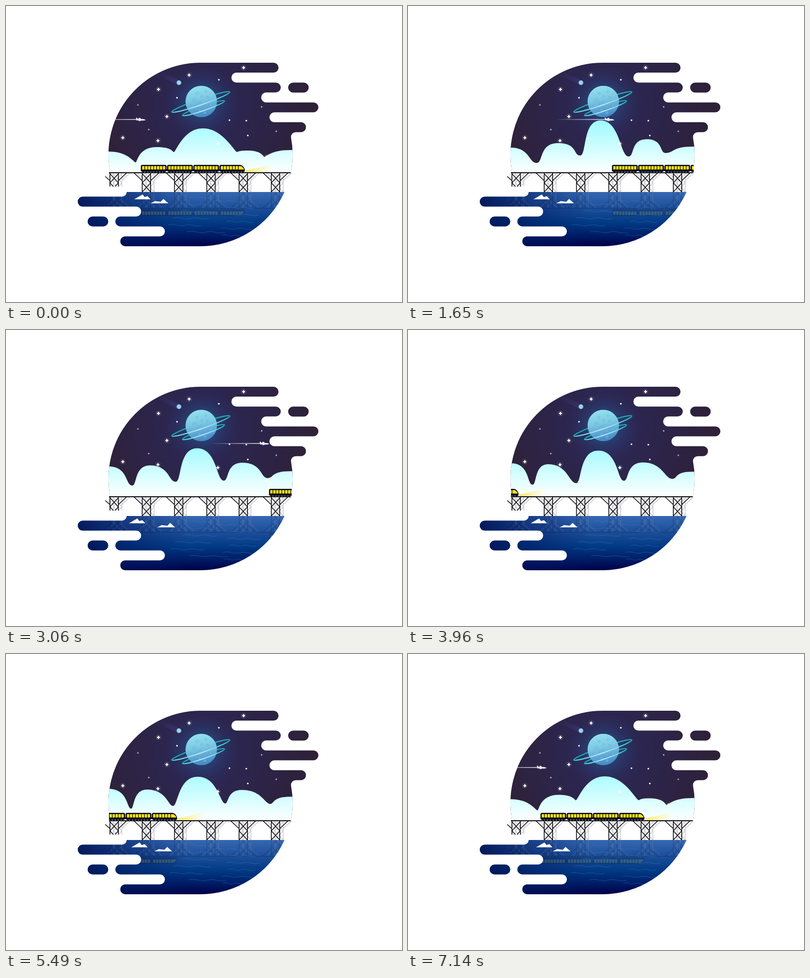
Recreate the animation shown at these times as an HTML page. Size 800 px wide and 600 px high, loop 7.17 s.

```html
<!DOCTYPE html>
<html lang="en">
<head>
<meta charset="utf-8">
<title>Night train</title>
<style>
html, body { margin: 0; width: 100%; height: 100%; overflow: hidden; background: #fff; }
svg { display: block; width: 100%; height: 100%; }
</style>
</head>
<body>
<svg viewBox="0 0 800 600" xmlns="http://www.w3.org/2000/svg">
  <defs>
    <radialGradient id="skyFill" gradientUnits="userSpaceOnUse" cx="398" cy="200" r="215">
      <stop offset="0" stop-color="#2d2b60"/><stop offset=".35" stop-color="#2c264f"/>
      <stop offset=".7" stop-color="#2d2344"/><stop offset="1" stop-color="#2e2138"/>
    </radialGradient>
    <radialGradient id="halo">
      <stop offset=".3" stop-color="#1d7099" stop-opacity=".42"/><stop offset=".65" stop-color="#22508c" stop-opacity=".15"/>
      <stop offset="1" stop-color="#2d2b60" stop-opacity="0"/>
    </radialGradient>
    <radialGradient id="starGlow">
      <stop offset="0" stop-color="#fffbd8" stop-opacity=".28"/><stop offset="1" stop-color="#fffbd8" stop-opacity="0"/>
    </radialGradient>
    <linearGradient id="planetFill" x2=".2" y2="1">
      <stop offset="0" stop-color="#98e6f2"/><stop offset=".5" stop-color="#7cc8e3"/><stop offset="1" stop-color="#4a8dc8"/>
    </linearGradient>
    <linearGradient id="ringFill">
      <stop offset="0" stop-color="#3fd4dc"/><stop offset=".45" stop-color="#c0ecfb"/>
      <stop offset=".75" stop-color="#7adbe6"/><stop offset="1" stop-color="#12b3b3"/>
    </linearGradient>
    <linearGradient id="cometTail" gradientUnits="userSpaceOnUse" x1="350" y1="156" x2="304" y2="134">
      <stop offset="0" stop-color="#45458c" stop-opacity=".45"/><stop offset="1" stop-color="#3a3570" stop-opacity="0"/>
    </linearGradient>
    <linearGradient id="cloudFill" gradientUnits="userSpaceOnUse" x1="0" y1="236" x2="0" y2="338">
      <stop offset="0" stop-color="#a2fbff"/><stop offset=".5" stop-color="#cffdff"/><stop offset="1" stop-color="#fff"/>
    </linearGradient>
    <linearGradient id="trailFill">
      <stop offset="0" stop-color="#fff" stop-opacity="0"/><stop offset="1" stop-color="#dcd8ea" stop-opacity=".9"/>
    </linearGradient>
    <linearGradient id="beamFill">
      <stop offset="0" stop-color="#ffe75c"/><stop offset=".4" stop-color="#ffef94" stop-opacity=".75"/>
      <stop offset="1" stop-color="#fff6c0" stop-opacity="0"/>
    </linearGradient>
    <linearGradient id="waterFill" gradientUnits="userSpaceOnUse" x1="0" y1="377" x2="0" y2="487">
      <stop offset="0" stop-color="#3668b2"/><stop offset=".3" stop-color="#1c4e99"/>
      <stop offset=".58" stop-color="#003882"/><stop offset=".8" stop-color="#001c66"/><stop offset="1" stop-color="#000046"/>
    </linearGradient>
    <linearGradient id="waterShade" gradientUnits="userSpaceOnUse" x1="150" y1="0" x2="370" y2="0">
      <stop offset="0" stop-color="#00104f" stop-opacity=".85"/><stop offset=".4" stop-color="#00185c" stop-opacity=".55"/>
      <stop offset="1" stop-color="#00206a" stop-opacity="0"/>
    </linearGradient>
    <clipPath id="skyClip">
      <path id="skyShape"/>
      <rect x="570" y="155.3" width="41.5" height="20.2" rx="10.1"/>
    </clipPath>
    <clipPath id="waterClip">
      <path id="waterShape"/>
      <rect x="165" y="426.7" width="41.5" height="20.1" rx="10.05"/>
    </clipPath>
    <clipPath id="trackClip"><rect x="208" y="300" width="369" height="39"/></clipPath>
    <path id="star" d="M-2.9 0H2.9M0-2.9V2.9" stroke="#fff" stroke-width="2"/>
  </defs>

  <g clip-path="url(#skyClip)">
    <rect x="200" y="110" width="440" height="230" fill="url(#skyFill)"/>
    <path d="M347 160L300 137 306 130 351 151Z" fill="url(#cometTail)"/>
    <circle cx="349.4" cy="155.5" r="4.7" fill="#a6e1f8"/>
    <circle cx="395" cy="195" r="80" fill="url(#halo)"/>
    <g id="planet" fill="none" stroke-width="2.2"></g>
    <path id="cloud" fill="url(#cloudFill)"/>
    <g id="stars"></g>
    <g id="plane">
      <rect x="-118" y="229.2" width="99" height="1.8" fill="url(#trailFill)"/>
      <path d="M-20 226.5h2l2 2.3h1l1-2h3l1 2.2h4Q-2 229.5 0 231.3L-5 232.2H-9l-3 1h-3l1-1.2H-19Z" fill="#ebe8f6"/>
    </g>
  </g>

  <g id="bridge" fill="none"></g>
  <g clip-path="url(#trackClip)">
    <g id="ride">
      <path d="M211 333.5L270 320V337H213Z" fill="url(#beamFill)"/>
      <g id="train"></g>
    </g>
  </g>

  <g clip-path="url(#waterClip)">
    <rect x="140" y="377" width="440" height="112" fill="url(#waterFill)"/>
    <rect x="140" y="377" width="240" height="112" fill="url(#waterShade)"/>
    <g transform="matrix(1 0 0 -1 0 748)" opacity=".15">
      <use href="#bridge"/>
      <g clip-path="url(#trackClip)"><use id="echo" href="#train"/></g>
    </g>
    <g id="waves" fill="none" stroke="#3f86d0" stroke-opacity=".32" stroke-width="1.2" stroke-linecap="round"></g>
    <path id="berg1" d="M259 391.8L276 382 280 387.2 286 385.6 292 391.8Z" fill="#fff"/>
    <path id="berg2" d="M292 400L301 395.6 312.5 396.8 318 391 328 400Z" fill="#fff"/>
  </g>
</svg>
<script>
const LOOP = 7170, CYCLE = 7200, HALF = CYCLE / 2, STEP = 30;
const byId = id => document.getElementById(id);
const lerp = (a, b, f) => a + (b - a) * f;

function add(parent, tag, attrs) {
  const el = document.createElementNS("http://www.w3.org/2000/svg", tag);
  for (const key in attrs) el.setAttribute(key, attrs[key]);
  return parent.appendChild(el);
}

function seeded(seed) {
  return (lo, hi) => {
    seed = (seed * 16807) % 2147483647;
    return lerp(lo, hi, seed / 2147483647);
  };
}

// Rounded bands stacked row by row: each end turns outward, the next inward.
const bands = (ends, rise) => ends.map((x, i) => `H${x}a10.05 10.05 0 0 ${1 - i % 2} 0 ${rise}`).join("");

function drawMasks() {
  byId("skyShape").setAttribute("d", "M210.7 338A186 186 0 0 1 393 115"
    + bands([540.5, 465.4, 545, 525.5, 621, 542.3, 596], 20.1)
    + "H586a10 10 0 0 0-10.3 10.3A186 186 0 0 1 575.3 338Z");
  byId("waterShape").setAttribute("d", "M562.7 377A186 186 0 0 1 393 487"
    + bands([241, 311, 231, 263, 155], -20.1)
    + "H234a10 10 0 0 0 10-9.5Z");
}

function drawPlanet() {
  const g = byId("planet"), rand = seeded(11);
  const ring = (front, x, y, rx, ry) => add(g, "path", {
    d: `M${-rx} 0A${rx} ${ry} 0 0 ${front ? 0 : 1} ${rx} 0`,
    transform: `translate(${x} ${y}) rotate(-19)`,
    stroke: front ? "url(#ringFill)" : "#1fb0b4"
  });
  const rings = front => {
    ring(front, 393.5, 194.5, 62, 5.8);
    ring(front, 399, 207, 45, 4.8);
  };
  rings(false);
  add(g, "circle", { cx: 394.5, cy: 193.5, r: 31.8, fill: "url(#planetFill)" });
  for (let i = 0; i < 12; i++) {
    const turn = i * 2.4, far = 7 * Math.sqrt(i), r = rand(2, 5);
    const cx = 394.5 + far * Math.cos(turn), cy = 193.5 + far * Math.sin(turn);
    add(g, "circle", { cx, cy, r, fill: "#4f9fca", "fill-opacity": .25 });
    add(g, "circle", { cx: cx + .8, cy: cy + .8, r: r * .7, fill: "#86d0ea", "fill-opacity": .3 });
  }
  rings(true);
}

function drawStars() {
  const g = byId("stars");
  const crosses = [[480, 125], [370, 140], [308, 169], [325, 224], [236, 267], [307, 273], [428, 279], [526, 306]];
  const bright = [[430, 149.5], [451.5, 231.5], [485.5, 232.5], [488.5, 262.5], [345.5, 186], [363.5, 268.5]];
  const faint = [[266.5, 200.5], [288.5, 250.5], [516.5, 204.5], [546, 254]];
  const dot = opacity => ([cx, cy]) => add(g, "circle", { cx, cy, r: 1.7, fill: "#fff", opacity });
  for (const [x, y] of crosses) {
    add(g, "circle", { cx: x, cy: y, r: 7, fill: "url(#starGlow)" });
    add(g, "use", { href: "#star", x, y });
  }
  bright.forEach(dot(.95));
  faint.forEach(dot(.55));
}

function drawBridge() {
  const g = byId("bridge"), panel = 18.5;
  const tower = (x, foot) => {
    const l = x - 8.5, r = x + 8.5;
    let d = `M${l} 338V${foot}M${r} 338V${foot}`;
    for (let y = 340; y < foot - 1; y += panel) {
      const end = Math.min(y + panel, foot), run = 17 * (end - y) / panel;
      d += `M${l} ${y}L${l + run} ${end}M${r} ${y}L${r - run} ${end}`;
    }
    return d;
  };
  const struts = (x, reach) => `M${x - reach} ${363.5 - reach}L${x - 8.5} 354M${x + 25.5} 338L${x + 8.5} 354`;
  for (const back of [true, false]) {
    const stroke = back ? "#c6c4c8" : "#08080f";
    for (let i = 0; i < 6; i++) {
      const x = 218.5 + i * 65.2 + (back ? 7 : 0);
      const d = tower(x, i ? 377 : 366) + struts(x, i ? 25.5 : 18);
      add(g, "path", { d, stroke, "stroke-width": back ? 1.3 : 1.6 });
    }
  }
  add(g, "path", { d: "M208 338H575", stroke: "#08080f", "stroke-width": 2 });
}

function drawTrain() {
  const dark = "#0c0a1e";
  for (let i = 0; i < 4; i++) {
    const lead = i === 3;
    const car = add(byId("train"), "g", { transform: `translate(${i * 53} 0)`, fill: dark });
    const front = lead ? "H42Q48 323 51 331V335" : "H49Q52 322 52 325V335";
    add(car, "path", { d: `M3 322${front}H0V325Q0 322 3 322Z` });
    add(car, "rect", { x: 1.5, y: 334, width: 49, height: 2.2 });
    if (i) add(car, "rect", { x: -2, y: 331, width: 3, height: 3 });
    for (let w = 0; w < 8; w++) {
      add(car, "circle", { cx: 5 + w * 6, cy: 336, r: 1.6 });
      if (!lead || w < 6) add(car, "rect", { x: 2.6 + w * 6, y: 324.6, width: 4.7, height: 6.8, rx: .6, fill: "#ffea00" });
    }
    if (lead) add(car, "path", { d: "M38.6 324.6H43Q47 326 49.5 331.4H38.6Z", fill: "#ffe21a" });
  }
}

function drawWaves() {
  const rand = seeded(7);
  for (let i = 0; i < 12; i++) {
    const y = 388 + i * 7, part = rand(10, 20);
    const x = i % 2 ? rand(410, 460) : rand(325, 375);
    add(byId("waves"), "path", { d: `M${x} ${y}q${part / 2}-2.4 ${part} 0` + `t${part} .3`.repeat(3) });
  }
}

// Cloud outline at three moments; knots alternate valley and peak.
const poses = [
  { at: 0, round: .08, left: 295, right: 292,
    knots: [[262, 317], [305, 286], [339, 296], [398, 248], [467, 296], [487, 293], [522, 306]] },
  { at: 1650, round: .32, left: 287, right: 285,
    knots: [[260, 318], [303, 278], [348, 303], [389, 232], [446, 305], [482, 270], [520, 298]] },
  { at: 4770, round: .25, left: 264, right: 288,
    knots: [[249, 312], [276, 270], [337, 313], [383, 249], [433, 306], [472, 268], [539, 303]] }
];

function cloudPath(t) {
  const n = poses.filter(p => p.at <= t).length;
  const a = poses[n - 1], b = poses[n % poses.length];
  const f = (t - a.at) / ((b.at || CYCLE) - a.at);
  const mix = key => lerp(a[key], b[key], f);
  const knots = [
    [207, mix("left")],
    ...a.knots.map(([x, y], i) => [lerp(x, b.knots[i][0], f), lerp(y, b.knots[i][1], f)]),
    [574, mix("right")]
  ];
  const handle = (i, dx) => i % 2 ? mix("round") * dx : Math.min(.9 * dx, 40);
  let d = `M${knots[0]}`;
  for (let i = 1; i < knots.length; i++) {
    const [x0, y0] = knots[i - 1], [x1, y1] = knots[i], dx = x1 - x0;
    d += `C${x0 + handle(i - 1, dx)} ${y0} ${x1 - handle(i, dx)} ${y1} ${x1} ${y1}`;
  }
  return d + `H580V340H200V${knots[0][1]}Z`;
}

// Steady travel out of view, then a fresh entry from the left.
function travel(t, from, exit, entry) {
  return t < HALF ? lerp(from, exit, t / HALF) : lerp(entry, from, t / HALF - 1);
}

const moveX = (id, x) => byId(id).setAttribute("transform", `translate(${x.toFixed(2)} 0)`);

function render(t) {
  const train = travel(t, 272.4, 577, -15.5);
  const drift = 1 - Math.abs(t - HALF) / HALF;
  moveX("ride", train);
  moveX("echo", train);
  moveX("plane", travel(t, 282.5, 576.5, 152));
  moveX("berg1", -12.5 * drift);
  moveX("berg2", 16 * drift);
  moveX("waves", 6 * drift);
  byId("cloud").setAttribute("d", cloudPath(t));
}

drawMasks();
drawPlanet();
drawStars();
drawBridge();
drawTrain();
drawWaves();

const start = performance.now();
function tick() {
  const t = (performance.now() - start) % LOOP;
  render(Math.floor(t / STEP) * STEP);
  requestAnimationFrame(tick);
}
render(0);
requestAnimationFrame(tick);
</script>
</body>
</html>
```
